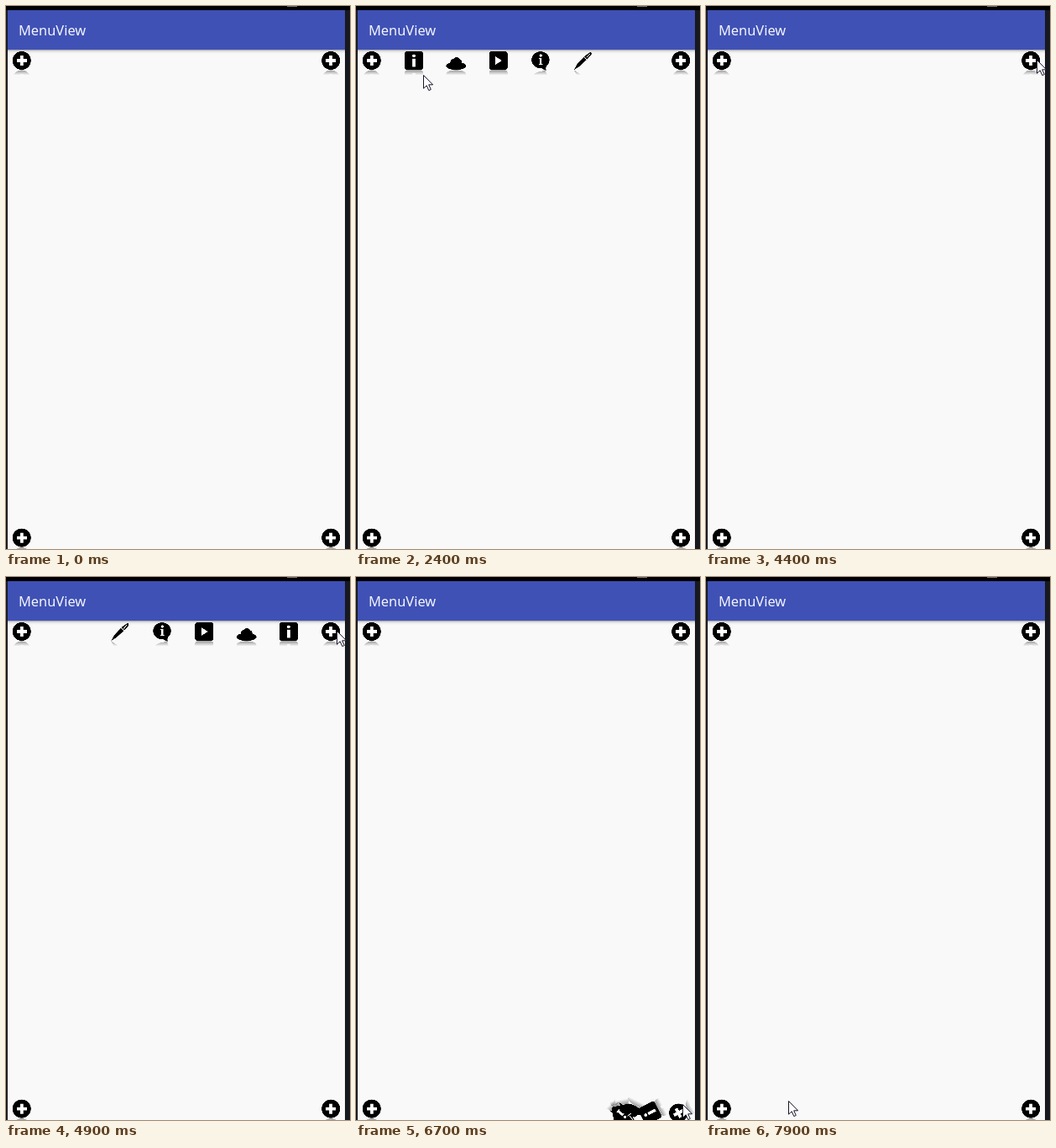
An HTML page with a canvas that plays this animation: 410 px wide and 647 px high, repeating every 8 s.

```html
<!DOCTYPE html>
<html lang="en">
<head>
<meta charset="utf-8">
<title>MenuView</title>
<style>
  html, body { margin: 0; width: 100%; height: 100%; overflow: hidden; }
  body { position: relative; background: #f9f9f9; }
  div, canvas { position: absolute; }
  .status { left: 0; top: 0; width: 410px; height: 5px; background: #000; }
  .status i { position: absolute; left: 335px; top: 0; width: 12px; height: 1px; background: #777; }
  .bar {
    left: 2px; top: 5px; width: 389px; height: 47px; padding-left: 13px;
    background: #3f51b5; color: #f4f5fb; font: 16.4px/48px "Noto Sans", sans-serif;
  }
  .shadow { left: 2px; top: 52px; width: 402px; height: 5px; background: linear-gradient(#0005, #0001 45%, #0000); }
  .left { left: 0; top: 0; width: 2px; height: 647px; background: #1b1b20; }
  .right { left: 404px; top: 0; width: 6px; height: 647px; background: #17191e; }
  canvas { left: 0; top: 0; }
</style>
</head>
<body>
<div class="bar">MenuView</div>
<div class="shadow"></div>
<div class="left"></div>
<div class="right"></div>
<div class="status"><i></i></div>
<canvas id="stage" width="410" height="647"></canvas>
<script>
const LOOP = 8000, MOVE = 300, STAGGER = 20, GAP = 50.3;
const LIFT = 3.4;               // icon centre above the rotation pivot
const SCALE = 4, HALF = 16;     // sprite resolution and half size
const ctx = document.getElementById('stage').getContext('2d');

const clamp = v => Math.min(1, Math.max(0, v));
const ease = t => 0.5 - Math.cos(Math.PI * clamp(t)) / 2;

function fill(c, color, d) {
  c.fillStyle = color;
  c.fill(new Path2D(d));
}
function disc(c, color, x, y, rx, ry = rx) {
  c.fillStyle = color;
  c.beginPath();
  c.ellipse(x, y, rx, ry, 0, 0, 7);
  c.fill();
}
function tile(c) {
  c.fillStyle = '#000';
  c.beginPath();
  c.roundRect(-11, -11, 22, 22, 3);
  c.fill();
}

const icons = {
  plus(c) {
    disc(c, '#000', 0, 0, 11);
    fill(c, '#fff', 'M-1.9-6h3.8v4.1H6v3.8H1.9V6h-3.8V1.9H-6v-3.8h4.1z');
  },
  info(c) {
    tile(c);
    disc(c, '#fff', 0, -5.6, 1.9);
    fill(c, '#fff', 'M-1.7-2.4h3.4V7.5h-3.4z');
  },
  cloud(c) {
    fill(c, '#000', 'M-12 6.5C-11 3.5-9 3-7 3.2C-7-1-4.5-2-3-2C-1.5-4.6 3-4.4 4.5-1.5C6.5-1 7.2 1 7 3.2C10 3 11.5 4.5 12 6.5C11 10 5 11 0 11S-11 10-12 6.5z');
  },
  play(c) {
    tile(c);
    fill(c, '#fff', 'M-3.6-5L4.4 0L-3.6 5z');
  },
  bubble(c) {
    disc(c, '#000', 0, -0.8, 10.7, 10);
    fill(c, '#000', 'M0 8L8 5Q5.5 9 7 11.5Q3 11 0 8z');
    disc(c, '#fff', 0.2, -6, 1.6);
    fill(c, '#fff', 'M-2-3H1.5V4H2.6V5.4H-2.2V4H-1V-1.7H-2z');
  },
  pen(c) {
    fill(c, '#000', 'M-10.5 11.2L-6.5 4L2.5-5.5L9.3-10.2Q11-9.5 10.3-7L5.2-1.4L-4 7z');
    c.strokeStyle = '#f9f9f9';
    c.lineWidth = 0.9;
    c.stroke(new Path2D('M1.2-4.8L5-1M4.5-3.5L8.5-8'));
  }
};

// Icon plus its fading mirror image
function sprite(draw) {
  const size = 2 * HALF * SCALE;
  const make = () => {
    const cv = Object.assign(document.createElement('canvas'), { width: size, height: size });
    const c = cv.getContext('2d');
    c.scale(SCALE, SCALE);
    c.translate(HALF, HALF - LIFT);
    return c;
  };
  const mirror = make();
  mirror.save();
  mirror.translate(0, 22.4);
  mirror.scale(1, -1);
  draw(mirror);
  mirror.restore();
  const fade = mirror.createLinearGradient(0, 11, 0, 17.5);
  fade.addColorStop(0, '#0006');
  fade.addColorStop(1, '#0000');
  mirror.globalCompositeOperation = 'destination-in';
  mirror.fillStyle = fade;
  mirror.fillRect(-HALF, -HALF, 2 * HALF, 3 * HALF);

  const c = make();
  draw(c);
  c.setTransform(1, 0, 0, 1, 0, 0);
  c.drawImage(mirror.canvas, 0, 0);
  return c.canvas;
}

const [plus, ...items] = Object.values(icons).map(sprite);

const menus = [
  { x: 18.7, y: 68.4, dir: 1, open: 1283, close: 2990 },
  { x: 387.2, y: 68.4, dir: -1, open: 4520, close: 5447 },
  { x: 18.7, y: 637, dir: 1, open: LOOP, close: LOOP },
  { x: 387.2, y: 637, dir: -1, open: 6517, close: 7250 }
];

// Pointer tip: time, x, y
const trail = [
  [300, 382, 54], [600, 250, 98], [850, 110, 97], [950, 60, 86], [1100, 19, 64],
  [1700, 19, 64], [2100, 62, 97], [2250, 74, 96], [2400, 80, 82], [2800, 19, 63],
  [3850, 19, 63], [4400, 394, 64], [5480, 394, 64], [5700, 386, 200],
  [6300, 388, 625], [6400, 389, 628], [7300, 389, 628], [7880, 98, 624], [LOOP, 98, 624]
];

function put(img, x, y, turn) {
  ctx.save();
  ctx.translate(x, y);
  ctx.rotate(turn * 2 * Math.PI);
  ctx.drawImage(img, -HALF, -HALF, 2 * HALF, 2 * HALF);
  ctx.restore();
}

function drawMenu({ x, y, dir, open, close }, time) {
  const closing = time >= close;
  const since = time - (closing ? close : open);
  put(plus, x, y, ease(since / MOVE));
  if (time < open) return;
  items.forEach((img, i) => {
    const t = (since - i * STAGGER) / MOVE;
    if (closing && t >= 1) return;
    const p = ease(t);
    put(img, x + dir * GAP * (i + 1) * (closing ? 1 - p : p), y, p);
  });
}

const arrow = new Path2D('M.5.5V16.2L4.2 12.8L6.8 18.6L9.3 17.5L6.7 11.8H11.6z');

function drawPointer(time) {
  const n = trail.findIndex(k => k[0] > time);
  if (n < 1) return;
  const [t0, x0, y0] = trail[n - 1], [t1, x1, y1] = trail[n];
  const f = (time - t0) / (t1 - t0);
  ctx.save();
  ctx.translate(Math.round(x0 + (x1 - x0) * f), Math.round(y0 + (y1 - y0) * f));
  ctx.fillStyle = '#fff';
  ctx.strokeStyle = '#15152a';
  ctx.lineWidth = 1;
  ctx.fill(arrow);
  ctx.stroke(arrow);
  ctx.restore();
}

const start = performance.now();
function frame() {
  const time = (performance.now() - start) % LOOP;
  ctx.clearRect(0, 0, 410, 647);
  menus.forEach(m => drawMenu(m, time));
  drawPointer(time);
  requestAnimationFrame(frame);
}
frame();
</script>
</body>
</html>
```
